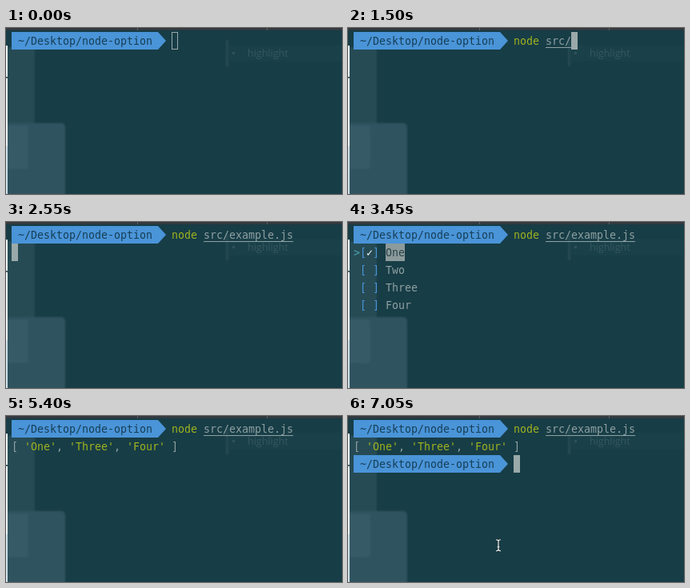
These frames come from a looping animation (420 by 208 pixels, 7.08 s). An HTML page with a canvas:

```html
<!DOCTYPE html>
<html>
<head>
<meta charset="utf-8">
<style>
  html, body { margin: 0; width: 100%; height: 100%; overflow: hidden; background: #173d46; }
  canvas { display: block; }
</style>
</head>
<body>
<canvas id="stage" width="420" height="208"></canvas>
<script>
const ctx = document.getElementById('stage').getContext('2d');
const LOOP = 7080, CELL = 8, ROW = 22, LEFT = 7, TOP = 5;
const MONO = '13.29px "DejaVu Sans Mono", monospace';
const BG = '#173d46', BLUE = '#4a94d8', GREEN = '#9fb31f', GREY = '#8fa0a2', CURSOR = '#9aa9aa';
const ITEMS = ['One', 'Two', 'Three', 'Four'];

// [time, value]: each value holds until the next time
const TYPED = [
  [0, ''], [870, 'n'], [930, 'nod'], [990, 'node '],
  [1140, 'node s'], [1260, 'node sr'], [1380, 'node src'], [1500, 'node src/'],
  [2130, 'node src/e'], [2220, 'node src/ex'], [2310, 'node src/example.js ']
];
const ACTIVE = [[2640, 0], [3630, 1], [3930, 2], [4500, 3]];
const CHECKED_AT = [3240, Infinity, 4350, 4650];
const ENTER = 2460, LIST = 2640, DONE = 5400, PROMPT = 5460, MOUSE = 6900;

const at = (steps, t) => steps.filter(s => s[0] <= t).pop()[1];
const colX = col => LEFT + col * CELL;
const rowY = row => TOP + row * ROW;

function rect(x, y, w, h, color) {
  ctx.fillStyle = color;
  ctx.fillRect(x, y, w, h);
}

function text(str, col, row, color) {
  ctx.font = MONO;
  ctx.fillStyle = color;
  ctx.fillText(str, colX(col), rowY(row) + 16);
}

function cursor(col, row, hollow) {
  if (!hollow) return rect(colX(col), rowY(row), CELL, ROW, CURSOR);
  ctx.strokeStyle = CURSOR;
  ctx.lineWidth = 1;
  ctx.strokeRect(colX(col) + .5, rowY(row) + .5, CELL - 1, ROW - 1);
}

function prompt(row) {
  const y = rowY(row);
  rect(LEFT, y, 183, ROW, BLUE);
  ctx.beginPath();
  ctx.moveTo(190, y);
  ctx.lineTo(200, y + ROW / 2);
  ctx.lineTo(190, y + ROW);
  ctx.fill();
  text('~/Desktop/node-option', 1, row, '#163f56');
}

function panel(x, y, w, h, radius, color) {
  ctx.fillStyle = color;
  ctx.beginPath();
  ctx.roundRect(x, y, w, h, radius);
  ctx.fill();
}

// Translucent window with the desktop faintly showing through
function backdrop() {
  rect(0, 0, 420, 208, BG);
  ctx.filter = 'blur(1px)';
  panel(0, 24, 36, 100, 0, '#24485200');
  panel(-4, 24, 40, 190, 0, '#264b55');
  panel(-6, 119, 80, 100, 5, '#305360');
  panel(-4, 122, 32, 55, 3, '#365a66');
  rect(275, 15, 3, 33, '#284c55');
  rect(278, 21, 142, 21, '#1a414a');
  ctx.filter = 'blur(.7px)';
  ctx.font = '12.5px "Open Sans", sans-serif';
  ctx.fillStyle = '#36575f';
  ctx.fillText('highlight', 302, 36);
  rect(283, 30, 3, 3, '#315159');
  ctx.filter = 'none';
  rect(0, 0, 420, 3, '#33393f');
  rect(164, 0, 1, 3, '#596066');
  rect(326, 0, 1, 3, '#596066');
  rect(0, 22, 2, 186, '#edf1f2');
  rect(0, 61, 2, 2, '#4b6068');
  rect(0, 148, 2, 60, '#cfe0e8');
}

function command(t) {
  const typed = at(TYPED, t), path = typed.slice(5).trim();
  text(typed.slice(0, 4), 25, 0, GREEN);
  if (path) {
    text(path, 30, 0, GREY);
    rect(colX(30), TOP + 19, path.length * CELL, 1, GREY);
  }
  if (t < ENTER) cursor(25 + typed.length, 0, t < 120);
}

function list(t) {
  const active = at(ACTIVE, t);
  ITEMS.forEach((item, i) => {
    const row = i + 1, on = i === active;
    if (on) {
      text('>', 0, row, '#4aa5ad');
      rect(colX(5), rowY(row), item.length * CELL, ROW, '#8c9a9b');
    }
    text('[ ]', 1, row, BLUE);
    if (t >= CHECKED_AT[i]) text('✓', 2, row, '#ffffff');
    text(item, 5, row, on ? '#28454b' : GREY);
  });
}

function result() {
  let col = 2;
  text('[', 0, 1, GREY);
  ITEMS.filter((_, i) => CHECKED_AT[i] < DONE).forEach((item, i, all) => {
    const quoted = `'${item}'`;
    text(quoted, col, 1, GREEN);
    col += quoted.length;
    if (i < all.length - 1) text(',', col++, 1, GREY);
    col++;
  });
  text(']', col, 1, GREY);
}

function pointer(t) {
  const p = Math.min(1, (t - MOUSE) / 150), ease = 1 - (1 - p) ** 2;
  const x = 207 - 19 * ease, y = 204 - 42 * ease;
  const beam = new Path2D('M-3-7Q0-7 0-5Q0-7 3-7M0-5V5M-3 7Q0 7 0 5Q0 7 3 7M-1.5 2H1.5');
  ctx.save();
  ctx.translate(x, y);
  for (const [width, color] of [[2.6, '#14282d'], [1.2, '#f2f5f5']]) {
    ctx.lineWidth = width;
    ctx.strokeStyle = color;
    ctx.stroke(beam);
  }
  ctx.restore();
}

function draw(t) {
  backdrop();
  prompt(0);
  command(t);
  if (t >= DONE) result();
  else if (t >= LIST) list(t);
  else if (t >= ENTER) cursor(0, 1);
  if (t >= PROMPT) {
    prompt(2);
    cursor(25, 2);
  }
  if (t >= MOUSE) pointer(t);
}

const start = performance.now();
function tick() {
  draw((performance.now() - start) % LOOP);
  requestAnimationFrame(tick);
}
tick();
</script>
</body>
</html>
```
